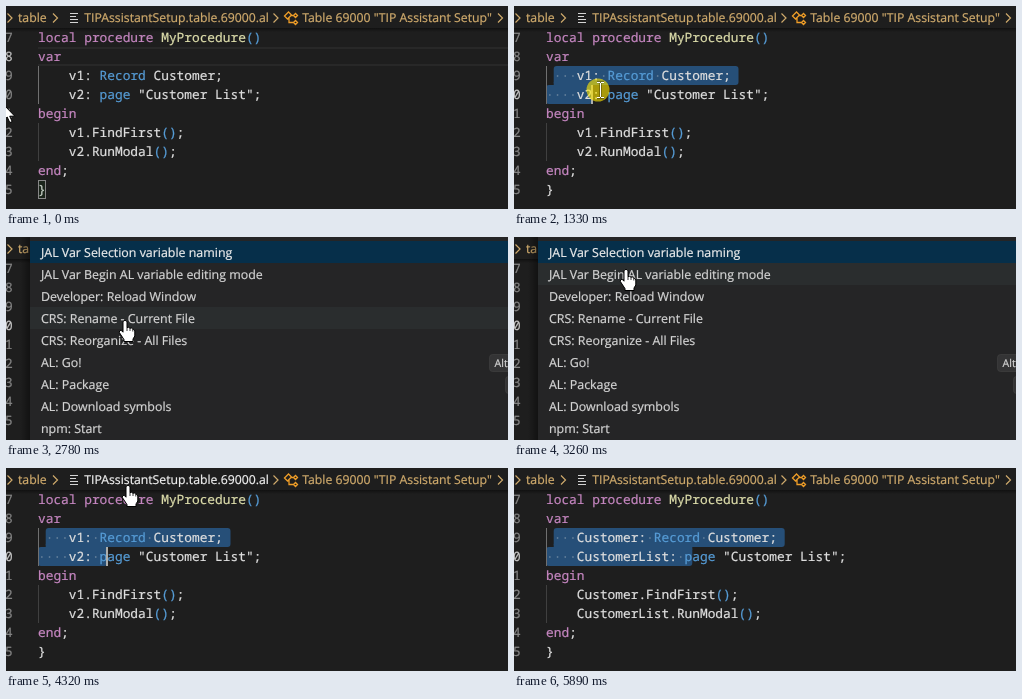
An HTML page that plays this animation: 502 by 203 pixels, repeating every 5970 ms.

```html
<!DOCTYPE html>
<html lang="en">
<head>
<meta charset="utf-8">
<title>Renaming variables in an editor</title>
<style>
  html, body { margin: 0; width: 100%; height: 100%; overflow: hidden; background: #1e1e1e; }
  svg { display: block; }
  text { text-rendering: geometricPrecision; fill: currentColor; stroke: currentColor; stroke-width: .22; }
  .code text { font: 12.83px "Noto Sans Mono", "DejaVu Sans Mono", monospace; }
  .ui text { font: 12.4px "Open Sans", "Noto Sans", sans-serif; }
  #crumbs text { font-size: 12.25px; }
  .ui .key { font-size: 10.6px; }
</style>
</head>
<body>
<svg id="stage" width="502" height="203" viewBox="0 0 502 203">
  <defs>
    <linearGradient id="down" x2="0" y2="1">
      <stop stop-color="#000" stop-opacity=".45"/><stop offset="1" stop-color="#000" stop-opacity="0"/>
    </linearGradient>
    <linearGradient id="left">
      <stop stop-color="#000" stop-opacity="0"/><stop offset="1" stop-color="#000" stop-opacity=".4"/>
    </linearGradient>
    <g id="arrow"><path d="M.5 .5V16.5L4.2 13L6.8 18.6L9.2 17.5L6.7 12.2H11.8Z" fill="#fff" stroke="#000"/></g>
    <g id="beam" fill="none">
      <path d="M-3 -8H-.5L0 -7L.5 -8H4M.5 -8V8M-3 8H4" stroke="#000" stroke-width="2.6" stroke-opacity=".35"/>
      <path d="M-3 -7.5H0M1 -7.5H4M.5 -7V7M-3 7.5H0M1 7.5H4" stroke="#fff"/>
    </g>
    <g id="hand">
      <path d="M-2 1.5Q0 -1 2 1.5V7.6Q3.6 6.8 5 8.2Q6.8 7.5 7.8 9.1Q9.6 9 9.8 11V16L8 19V21.5H-1V19.6L-5.6 12.6Q-6 10.2 -4 10.2L-2 12.2Z" fill="#fff" stroke="#000"/>
      <path d="M2 7.5V11M5 8.2V11M7.8 9.1V11.5" stroke="#000" stroke-width=".8"/>
    </g>
  </defs>
  <rect width="502" height="203" fill="#1e1e1e"/>
  <path id="activeLine" d="M32 42H502M32 59H502" stroke="#282828" stroke-width="2"/>
  <g id="selection"></g>
  <g id="guides"></g>
  <g id="numbers" class="code"></g>
  <g id="before" class="code"></g>
  <g id="after" class="code"></g>
  <rect id="brace" x="32.5" y="174.5" width="7" height="18" fill="#006400" fill-opacity=".1" stroke="#888"/>
  <path id="fold" d="M18 49L21.3 52.3L24.6 49" fill="none" stroke="#c5c5c5" stroke-opacity=".15"/>
  <rect id="caret" width="2" height="19" fill="#aeafad"/>
  <g id="crumbs" class="ui"></g>
  <g id="palette" class="ui"></g>
  <circle id="press" r="11.5" fill="#ffe600" fill-opacity=".62"/>
  <use id="mouse"/>
</svg>
<script>
const LOOP = 5970, X0 = 32, CW = 7.7, LH = 19;
const CRUMB = '#cfaa6c', ROW_TOP = 4, ROW_H = 22;
const $ = id => document.getElementById(id);
const colX = col => X0 + col * CW;
const lineY = line => 22 + (line - 7) * LH;
const text = (x, y, s, color, extra = '') => `<text x="${x}" y="${y}" color="${color}" ${extra}>${s}</text>`;
const rect = (x, y, w, h, fill, extra = '') =>
  `<rect x="${x}" y="${y}" width="${w}" height="${h}" fill="${fill}" ${extra}/>`;
const show = (id, on) => { $(id).style.display = on ? '' : 'none'; };

// ---- code ----
const program = (rec, list) => [
  'local procedure MyProcedure()', 'var',
  `    ${rec}: Record Customer;`, `    ${list}: page "Customer List";`,
  'begin', `    ${rec}.FindFirst();`, `    ${list}.RunModal();`, 'end;', '}'
];
const before = program('v1', 'v2'), after = program('Customer', 'CustomerList');

function tint(token) {
  if (/^(local|procedure|var|begin|end)$/.test(token)) return '#c586c0';
  if (/^(Record|page|[()]+)$/.test(token)) return '#569cd6';
  return token === 'MyProcedure' ? '#dcdcaa' : '#dedede';
}
const drawCode = lines => lines.map((line, i) =>
  [...line.matchAll(/\w+|[()]+|[^\w\s()]+/g)].map(m =>
    text(colX(m.index), lineY(i + 7) + 14, m[0], tint(m[0]))).join('')).join('');

$('before').innerHTML = drawCode(before);
$('after').innerHTML = drawCode(after);
$('guides').innerHTML = rect(32, 60, 1, 38, '#707070') + rect(32, 117, 1, 38, '#404040');
$('numbers').innerHTML = before.map((_, i) =>
  text(-1, lineY(i + 7) + 14, (i + 7) % 10, '#858585')).join('');

// ---- breadcrumbs ----
const chevron = x => `<path d="M${x} 7.5L${x + 4.5} 12L${x} 16.5" fill="none" stroke="${CRUMB}" stroke-width="1.2"/>`;
$('crumbs').innerHTML = rect(0, 22, 502, 4, 'url(#down)') +
  [1.5, 47, 267.5, 492].map(chevron).join('') +
  text(12, 16, 'table', CRUMB) +
  [7, 10, 13, 16].map((y, i) => rect(64, y, i === 1 ? 6 : 8, 1, '#d4d4d4')).join('') +
  text(78.3, 16, 'TIPAssistantSetup.table.69000.al', CRUMB, 'id="file"') +
  `<path d="M278.5 10L282.5 6L285.5 9L281.5 13ZM284.5 9.5H287.5M283 12V16.5H287.5M287.5 9.5L289.5 7.5L291.5 9.5L289.5 11.5ZM287.5 16.5L289.5 14.5L291.5 16.5L289.5 18.5Z" fill="none" stroke="#ee9d28" stroke-width="1.3"/>` +
  text(296.2, 16, 'Table 69000 "TIP Assistant Setup"', CRUMB);

// ---- command palette ----
const commands = ['JAL Var Selection variable naming', 'JAL Var Begin AL variable editing mode',
  'Developer: Reload Window', 'CRS: Rename - Current File', 'CRS: Reorganize - All Files',
  'AL: Go!', 'AL: Package', 'AL: Download symbols', 'npm: Start'];
const badge = (x, y) => rect(x, y, 30, 17, '#808080', 'rx="3" fill-opacity=".17" stroke="#444" stroke-opacity=".6"');
$('palette').innerHTML = rect(14, 0, 10, 203, 'url(#left)') + rect(24, 0, 478, 203, '#252526') +
  rect(24, ROW_TOP, 478, ROW_H, '#062f4a') + rect(24, 0, 478, ROW_H, '#2a2d2e', 'id="hover"') +
  commands.map((s, i) => text(35, 20 + i * ROW_H, s, i ? '#d4d4d4' : '#ececec')).join('') +
  badge(483.5, 117.5) + text(488.5, 130, 'Alt', '#d4d4d4', 'class="key"') + badge(499.5, 139.5);

// ---- timeline: each entry holds until the next ----
function run(t0, t1, n, kind, a, b, c) {
  return Array.from({ length: n }, (_, i) => {
    const u = (i + 1) / n, v = 1 - u;
    const at = k => Math.round(v * v * a[k] + 2 * u * v * b[k] + u * u * c[k]);
    return [t0 + (t1 - t0) * i / (n - 1), kind, at(0), at(1)];
  });
}
const mouse = [
  [0, 'arrow', -3, 98], [70, ''],
  ...run(230, 790, 8, 'beam', [20, 104], [59, 84], [46, 68]),
  [840, 'beam', 43, 69], [920, 'beam', 43, 69, 1], [1000, 'beam', 46, 70, 1],
  [1090, 'beam', 52, 73, 1], [1170, 'beam', 60, 77, 1], [1250, 'beam', 71, 82, 1],
  [1330, 'beam', 86, 84, 1], [1430, 'beam', 106, 82, 1], [1510, 'beam', 106, 81, 1],
  [1760, 'beam', 106, 81], [2240, 'beam', 125, 89], [2470, 'beam', 123, 91],
  [2530, 'beam', 122, 92], [2600, 'hand', 122, 92],
  ...run(2780, 3260, 7, 'hand', [122, 92], [112, 62], [112, 32]),
  [3340, 'hand', 115, 25], [3400, 'hand', 117, 20], [3480, 'hand', 119, 17], [3800, 'hand', 122, 17],
  ...run(4880, 5420, 8, 'beam', [122, 17], [250, 75], [481, 191]),
  [5510, 'beam', 482, 196], [5590, '']
];
// time, line, column
const carets = [[0, 0, 0], [920, 9, 1], [1090, 9, 2], [1170, 9, 3], [1250, 10, 4],
  [1330, 10, 6], [1430, 10, 9], [4400, 10, 19]];
// time, caret lit
const blinks = [[0, 0], [920, 1], [1990, 0], [2470, 1], [2600, 0], [4180, 1],
  [4880, 0], [5420, 1], [5890, 0]];
const current = (table, t) => table.findLast(row => row[0] <= t);
const between = (t, a, b) => t >= a && t < b;

function drawSelection(lines, line, col) {
  if (!line) return '';
  const first = lines[2], multi = line === 10, color = '#264f78';
  const spans = [[9, 1, multi ? first.length : col]];
  if (multi) spans.push([10, 0, col]);
  let out = '';
  for (const [n, a, b] of spans) {
    if (b <= a) continue;
    const w = (b - a + (multi && n === 9 ? 1 : 0)) * CW;
    out += rect(colX(a), lineY(n), w, LH, color, 'rx="3"');
  }
  if (multi) out += rect(colX(1), 76, (col - 1) * CW, 6, color);
  for (const [n, a, b] of spans)
    for (let c = a; c < b; c++)
      if (lines[n - 7][c] === ' ')
        out += `<circle cx="${colX(c + .5)}" cy="${lineY(n) + 10}" r=".9" fill="#e3e4e2" fill-opacity=".3"/>`;
  return out;
}

let lastCaret;
function render(t) {
  const [, kind, x, y, pressed] = current(mouse, t);
  const caret = current(carets, t), [, line, col] = caret;
  const renamed = t >= 4400, open = between(t, 2600, 4180);

  if (caret !== lastCaret) {
    lastCaret = caret;
    $('selection').innerHTML = drawSelection(renamed ? after : before, line, col);
    [...$('numbers').children].forEach((n, i) =>
      n.setAttribute('color', i + 7 === (line || 8) ? '#c6c6c6' : '#858585'));
    $('caret').setAttribute('x', Math.floor(colX(col) - 1));
    $('caret').setAttribute('y', lineY(line));
  }
  show('before', !renamed);
  show('after', renamed);
  show('brace', !line);
  show('activeLine', !line);
  show('fold', between(t, 310, 920));
  show('caret', current(blinks, t)[1]);
  $('file').setAttribute('color', between(t, 4180, 4880) ? '#f0f0f0' : CRUMB);

  show('palette', open);
  const row = Math.floor((y - ROW_TOP) / ROW_H);
  show('hover', open && row > 0);
  if (open) $('hover').setAttribute('y', ROW_TOP + row * ROW_H);

  show('press', pressed);
  show('mouse', kind);
  if (kind) {
    // the pointer stays a hand until it leaves the breadcrumb row
    const shape = kind === 'beam' && y < 22 ? 'hand' : kind;
    $('mouse').setAttribute('href', '#' + shape);
    $('mouse').setAttribute('transform', `translate(${x} ${y})`);
    $('press').setAttribute('cx', x - 2);
    $('press').setAttribute('cy', y);
  }
}

const start = performance.now();
function tick() {
  render((performance.now() - start) % LOOP);
  requestAnimationFrame(tick);
}
tick();
</script>
</body>
</html>
```
